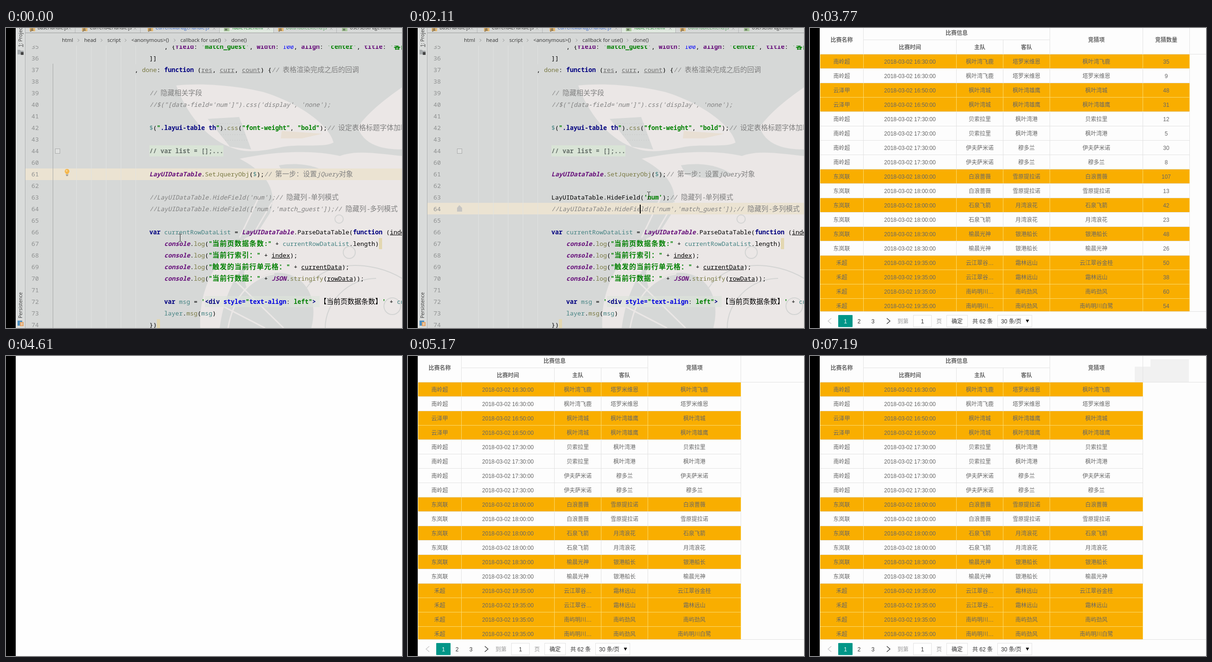
Animation, 856 px wide and 647 px high, one loop 8000 ms. Source, as an HTML page:

```html
<!DOCTYPE html>
<html lang="zh">
<head>
<meta charset="utf-8">
<title>Hide a table column</title>
<style>
html, body { margin: 0; width: 100%; height: 100%; overflow: hidden; background: #fefefe; }
#stage { position: absolute; left: 0; top: 0; width: 856px; height: 647px; overflow: hidden; }
#stage > div, #stage > svg, #code > * { position: absolute; left: 0; top: 0; }
#code, #code > svg, #page { width: 856px; height: 647px; }
#strip { width: 21px; height: 647px; background: #000; }
.anim, #code, #page { animation: 8s step-end infinite; }

#code { background: #d6d8d7; animation-name: code; }
.ln, .no { white-space: pre; font: 500 13.333px/25px "Noto Sans Mono", "DejaVu Sans Mono", monospace; color: #000; }
.no { width: 29px; text-align: right; color: #8f9191; }
.c { font: 15px/0 "Noto Sans CJK SC", "Noto Sans CJK", sans-serif; }
.k { color: #000080; font-weight: bold; }
.s { color: #008000; font-weight: bold; }
.s .c { font-weight: bold; letter-spacing: 1px; }
.a { color: #0000e0; font-weight: bold; }
.n { color: #0000ff; }
.p { color: #660e7a; font-weight: bold; }
.i { color: #660e7a; font-weight: bold; font-style: italic; }
.m { color: #7a7a43; }
.t { color: #458383; }
.g { color: #808080; font-style: italic; }
.q { color: #707070; text-decoration: underline; }
.u { text-decoration: underline; }
.f { color: #66706a; font-weight: bold; }
#row { left: 42px !important; width: 814px; height: 25px; background: #ebe3d2; animation-name: row; }
#caret { width: 2px; height: 19px; background: #000; animation-name: caret; }
#bulb { animation-name: bulb; }
#beam { animation-name: beam; }
#fold { animation-name: fold; }
#foldEnd { animation-name: foldEnd; }
#gutter { animation-name: gutter; }
#glint { animation-name: glint; }
#before { animation-name: before; }
#plain { animation-name: plain; }
#after { animation-name: after; }
.ui { font-family: "Open Sans", "Noto Sans", sans-serif; }

#page { animation-name: page; }
#page text { font: 12px "Liberation Sans", "Noto Sans CJK SC", "Noto Sans CJK", sans-serif; fill: #666; text-anchor: middle; }
#page text.h { font-weight: bold; }
.rows { animation-name: rows; }
.count { animation-name: count; }
#hoverA { animation-name: hoverA; }
#hoverB { animation-name: hoverB; }
#arrow { animation-name: arrow; }

@keyframes code { 0% { opacity: 1 } 47.125%, 100% { opacity: 0 } }
@keyframes page { 0% { opacity: 0 } 47.125% { opacity: 1 } 57.625% { opacity: 0 } 61.125%, 100% { opacity: 1 } }
@keyframes rows { 0% { opacity: 1 } 57.625% { opacity: 0 } 64.625%, 100% { opacity: 1 } }
@keyframes count { 0% { opacity: 1 } 64.625%, 100% { opacity: 0 } }
@keyframes hoverA { 0% { opacity: 0 } 74.875%, 100% { opacity: 1 } }
@keyframes hoverB { 0% { opacity: 0 } 81.625%, 100% { opacity: 1 } }
@keyframes row { 0% { transform: translateY(303px) } 8.75% { transform: translateY(353px) } 26.375%, 100% { transform: translateY(377px) } }
@keyframes caret {
  0% { opacity: 0; transform: translate(517px, 356px) }
  10.25% { opacity: 1; transform: translate(517px, 356px) }
  26.375%, 100% { opacity: 1; transform: translate(501px, 381px) }
}
@keyframes bulb {
  0% { opacity: 1; transform: translate(127px, 304px) }
  8.75% { opacity: 0; transform: translate(127px, 354px) }
  19.375% { opacity: 1; transform: translate(127px, 354px) }
  26.375% { opacity: 0; transform: translate(127px, 379px) }
  38.25%, 100% { opacity: 1; transform: translate(127px, 379px) }
}
@keyframes beam {
  0% { opacity: 1; transform: translate(373px, 444px) }
  1.875% { opacity: 1; transform: translate(435px, 419px) }
  3.875% { opacity: 1; transform: translate(540px, 356px) }
  5.375% { opacity: 1; transform: translate(636px, 305px) }
  6.875% { opacity: 1; transform: translate(584px, 336px) }
  8.75% { opacity: 1; transform: translate(517px, 353px) }
  34.875% { opacity: 1; transform: translate(579px, 484px) }
  36.75%, 100% { opacity: 0; transform: translate(579px, 484px) }
}
@keyframes fold { 0% { opacity: 1 } 8.75% { opacity: 0 } 13.75% { opacity: 1 } 26.375% { opacity: 0 } 29.875%, 100% { opacity: 1 } }
@keyframes foldEnd { 0% { opacity: 0 } 26.375%, 100% { opacity: 1 } }
@keyframes gutter { 0% { opacity: 0 } 45.625%, 100% { opacity: 1 } }
@keyframes glint { 0% { opacity: 0 } 34.875%, 100% { opacity: 1 } }
@keyframes before { 0% { opacity: 1 } 26.375%, 100% { opacity: 0 } }
@keyframes plain { 0% { opacity: 0 } 26.375% { opacity: 1 } 29.875%, 100% { opacity: 0 } }
@keyframes after { 0% { opacity: 0 } 29.875%, 100% { opacity: 1 } }
@keyframes arrow {
  0% { opacity: 0; transform: translate(763px, 272px) }
  70% { opacity: 1; transform: translate(763px, 272px) }
  71.5% { opacity: 1; transform: translate(790px, 150px) }
  73% { opacity: 1; transform: translate(807px, 56px) }
  74.875% { opacity: 1; transform: translate(762px, 7px) }
  76.375% { opacity: 1; transform: translate(736px, 22px) }
  78.25% { opacity: 1; transform: translate(768px, 109px) }
  79.875% { opacity: 1; transform: translate(790px, 88px) }
  81.625% { opacity: 1; transform: translate(744px, 22px) }
  83.125% { opacity: 1; transform: translate(714px, 50px) }
  84.625% { opacity: 1; transform: translate(702px, 101px) }
  86.5% { opacity: 1; transform: translate(720px, 442px) }
  88.375% { opacity: 1; transform: translate(722px, 630px) }
  89.875%, 100% { opacity: 0; transform: translate(722px, 630px) }
}
</style>
</head>
<body>
<div id="stage">
  <svg id="page">
    <rect width="856" height="647" fill="#fdfdfd"/>
    <rect id="hoverA" class="anim" x="736" y="7" width="83" height="49" fill="#f1f1f1"/>
    <rect id="hoverB" class="anim" x="702" y="23" width="34" height="33" fill="#f1f1f1"/>
    <g id="table"></g>
    <path id="arrow" class="anim" d="M.5 .5V16L4 12.6L6.6 18.4L9 17.4L6.4 11.8H11.5Z" fill="#fff" stroke="#000"/>
  </svg>

  <div id="code">
    <svg id="photo" fill="none">
      <g fill="#ebe7e6">
        <path d="M368 124C420 118 500 124 556 138C640 164 700 212 708 247C690 258 640 250 600 256C560 264 530 270 500 262C440 246 392 190 368 124Z"/>
        <path d="M856 128C810 160 780 186 760 214C772 246 800 262 856 262Z"/>
        <path d="M505 282C580 266 660 262 722 276C760 262 810 272 856 276V647H660C672 600 660 560 630 540C590 516 550 530 520 560C500 500 545 440 570 400C590 350 560 310 505 282Z"/>
        <path d="M420 647C416 570 450 490 520 452C560 432 610 440 640 470C560 450 480 510 462 647Z"/>
      </g>
      <g fill="#d6d8d7">
        <path d="M436 196L504 192L530 262L484 256Z"/>
        <path d="M590 296C640 288 680 300 700 316C670 326 630 326 600 316Z"/>
      </g>
      <path d="M596 222L684 228L640 238H594Z" fill="#e8dfd3"/>
      <g stroke="#d3d4d3" stroke-width="2">
        <circle cx="835" cy="600" r="18"/><circle cx="720" cy="412" r="9"/><circle cx="742" cy="484" r="13"/>
        <path d="M650 560C690 500 790 500 856 540M690 647C690 590 740 540 800 540"/>
      </g>
      <g stroke="#ebe7e6" stroke-width="3">
        <path d="M440 647C445 560 490 500 560 486M480 647C490 590 520 540 580 530M470 520L600 647M430 580L560 647M548 362L505 452M575 376L520 470"/>
      </g>
      <path d="M448 206L510 206M456 218L514 218M464 230L518 230M474 242L522 242" stroke="#c6c8c7" stroke-dasharray="2 3"/>
      <path id="glint" class="anim" d="M586 372L530 428L517 456L548 438L586 398Z" fill="#f5f4f1"/>
    </svg>
    <div id="row" class="anim"></div>
    <svg>
      <g id="guides" stroke="#e0e2e1"></g>
      <g id="gutter" class="anim">
        <rect x="102" y="77" width="9" height="570" fill="#cacaca"/>
        <g id="marks" fill="#dadada"></g>
        <path d="M118 101.5H310" stroke="#c9cbca"/>
      </g>
      <path id="fold" class="anim" d="M101.5 77V647" stroke="#a6a8a8"/>
      <rect x="106.500" y="260.500" width="10" height="10" fill="#dfe0df" stroke="#a9abab"/>
      <path id="foldEnd" class="anim" d="M106 396V388L111 382L117 388V396Z" fill="#c6c5c3"/>
      <rect x="310" y="253" width="160" height="24" fill="#d9e4d6"/>
      <rect x="806" y="453" width="7" height="24" fill="#e3d7b0"/>
      <rect x="326" y="628" width="7" height="19" fill="#e3d7b0"/>
      <rect x="430" y="578" width="248" height="24" fill="#dce5da" opacity=".6"/>
    </svg>
    <div id="lines"></div>
    <div id="caret" class="anim"></div>
    <svg class="ui">
      <rect width="856" height="38" fill="#d6d8d7"/>
      <rect x="461" width="117" height="10" fill="#dfe8df"/>
      <path d="M42 10.500H856" stroke="#9b9d9d"/>
      <g id="tabs" font-size="10"></g>
      <g id="crumbs" font-size="11.200" fill="#333"></g>
      <rect x="21" width="20" height="647" fill="#d9dbda"/>
      <path d="M21.500 0V647" stroke="#f4f4f4"/>
      <path d="M41.500 0V647" stroke="#aeb0b0"/>
      <g font-size="10.500" fill="#333">
        <text transform="translate(35 41) rotate(-90)"><tspan text-decoration="underline">1</tspan>: Project</text>
        <text transform="translate(35 626) rotate(-90)">Persistence</text>
      </g>
      <path d="M25 47H30L32 49H38V57H25Z" fill="#a5a9ab"/>
      <rect x="32" y="52" width="6" height="6" fill="#444"/>
      <rect x="25" y="631" width="10" height="11" fill="#4d8fc0"/>
      <path d="M30 634H38V643H30Z" fill="#e2a56a"/><path d="M32 637H36M32 640H36" stroke="#fff"/>
      <g id="bulb" class="anim">
        <path d="M5 0A5 5 0 0 1 8 9L7.500 11H2.500L2 9A5 5 0 0 1 5 0Z" fill="#f4b64c"/>
        <circle cx="4" cy="4" r="2" fill="#f9d68e"/>
        <path d="M2.500 12.500H7.500M3 14.500H7" stroke="#6e6e6e"/>
      </g>
      <path id="beam" class="anim" d="M0 .5H2.500L3.500 1.500L4.500 .5H7M3.500 1V16M0 16.500H2.500L3.500 15.500L4.500 16.500H7" fill="none" stroke="#222"/>
    </svg>
  </div>
  <div id="strip"></div>
</div>

<script>
const $ = id => document.getElementById(id);
const escape = s => s.replace(/&/g, '&amp;').replace(/</g, '&lt;');

// «x text» gives text the token class x
const paint = s => escape(s)
  .replace(/[\u3000-\u9fff\uff00-\uffef]+/g, '<span class="c" style="font-style:normal">$&</span>')
  .replace(/«(\w) (.*?)»/g, '<span class="$1">$2</span>');

const obj = '«i LayUIDataTable»';
const log = '«i console».«m log»(';
const note = '«g // 隐藏列-单列模式»';
const numbers = [35, 36, 37, 38, 39, 40, 41, 42, 43, 44, 60, 61, 62, 63, 64, 65, 66, 67, 68, 69, 70, 71, 72, 73, 74];
// line number, x, text, id of a changing line
const source = [
  [35, 342, ", {«p field»: «s 'match_guest'», «p width»: «n 100», «p align»: «s 'center'», «p title»: «s '客队'»"],
  [36, 310, ']]'],
  [37, 278, ', «m done»: «k function» («q res», «q curr», «q count») {«g // 表格渲染完成之后的回调»'],
  [39, 310, '«g // 隐藏相关字段»'],
  [40, 310, `«g //$("[data-field='num']").css('display', 'none');»`],
  [42, 310, '«t $»(«s "»«k .layui-table th»«s "»).«m css»(«s "font-weight"», «s "bold"»);«g // 设定表格标题字体加粗»'],
  [44, 310, '«f // var list = [];...»'],
  [61, 310, obj + '.«m SetJqueryObj»(«t $»);«g // 第一步：设置jQuery对象»'],
  [63, 310, "«g //LayUIDataTable.HideField('num');// 隐藏列-单列模式»", 'before'],
  [63, 310, "LayUIDataTable.HideField(«s 'num'»);" + note, 'plain'],
  [63, 310, obj + ".«m HideField»(«s 'num'»);" + note, 'after'],
  [64, 310, "«g //LayUIDataTable.HideField(['num','match_guest']);// 隐藏列-多列模式»"],
  [66, 310, '«k var» «t currentRowDataList» = ' + obj + '.ParseDataTable(«k function» («u index», «u currentData»'],
  [67, 342, log + '«s "当前页数据条数:"» + «t currentRowDataList».length)'],
  [68, 342, log + '«s "当前行索引："» + «u index»);'],
  [69, 342, log + '«s "触发的当前行单元格："» + «u currentData»);'],
  [70, 342, log + '«s "当前行数据："» + «i JSON».«m stringify»(«u rowData»));'],
  [72, 342, `«k var» «t msg» = «s '»«k <div» «a style=»«s "»«a text-align»: «s left"»«k >» 【当前页数据条数】«s '» + «t currentRowDataList»`],
  [73, 342, '«t layer».«m msg»(«t msg»)'],
  [74, 310, '})']
];
const place = (cls, x, i, html, id) =>
  `<div class="${cls}${id ? ' anim' : ''}"${id ? ` id="${id}"` : ''} style="position:absolute;left:${x}px;top:${28 + 25 * i}px">${html}</div>`;
$('lines').innerHTML =
  numbers.map((n, i) => place('no', 42, i, n)).join('') +
  source.map(([n, x, s, id]) => place('ln', x, numbers.indexOf(n), paint(s), id)).join('');

$('guides').innerHTML = [0, 1, 2, 3, 4].map(i => `<path d="M${152.5 + 32 * i} 38V${i < 4 ? 647 : 78}"/>`).join('') +
  '<path d="M280.500 102V647"/>';
$('marks').innerHTML = [89, 140, 165, 365, 440, 640].map(y => `<path d="M106 ${y - 5}H111V${y + 5}L106 ${y}Z"/>`).join('');

const tabs = [
  [51, 'JS', 'BaseHandle.js', '#333'], [164, 'JS', 'CurrentAEHandle.js', '#333'],
  [306, 'JS', 'CurrentManageHandle.js', '#2c5fc4'], [471, 'H', 'TableTest.html', '#0a7a1c'],
  [588, 'JS', 'DataTableExtend.js', '#4f9a58'], [726, 'H', 'UsersListPage.html', '#333']
];
const ends = [149, 290, 461, 578, 714];
$('tabs').innerHTML = tabs.map(([x, kind, name, color]) =>
  `<rect x="${x}" y="-4" width="12" height="11" fill="${kind == 'H' ? '#a9c99a' : '#e3b872'}"/>` +
  `<text x="${x + 2}" y="6" font-size="7" font-weight="bold" fill="#444">${kind}</text>` +
  `<text x="${x + 17}" y="3" fill="${color}">${name}</text>`).join('') +
  ends.map(x => `<path d="M${x + .5} 0V10" stroke="#b4b6b6"/><path d="M${x - 14} -2L${x - 8} 4M${x - 8} -2L${x - 14} 4" stroke="#a5a7a7"/>`).join('');

const crumbs = [[121, 'html'], [169, 'head'], [219, 'script'], [271, '<anonymous>()'], [377, 'callback for use()'], [487, 'done()']];
$('crumbs').innerHTML = crumbs.map(([x, s], i) => `<text x="${x}" y="30">${escape(s)}</text>` +
  (i ? `<path d="M${x - 14} 23.500L${x - 11} 26.500L${x - 14} 29.500" fill="none" stroke="#8a8c8c"/>` : '')).join('');

// ---- table ----
const edges = [21, 115, 316, 417, 518, 719, 820];
const mid = i => (edges[i] + edges[i + 1]) / 2 + .5;
const text = (x, y, s, attr = '') => `<text x="${x}" y="${y + 4.5}" ${attr}>${s}</text>`;
const rect = (x, y, w, h, fill, attr = '') => `<rect x="${x}" y="${y}" width="${w}" height="${h}" fill="${fill}" ${attr}/>`;
const line = '#e2e2e2', orange = '#f9ae00', gold = '#fbdc70';

// league, time, home, guest, then two [pick, count]; pick 0 is home, 1 is guest
const games = [
  ['南岭超', '16:30', '枫叶湾飞鹿', '塔罗米维恩', [0, 35], [1, 9]],
  ['云泽甲', '16:50', '枫叶湾城', '枫叶湾雄鹰', [0, 48], [1, 31]],
  ['南岭超', '17:30', '贝索拉里', '枫叶湾港', [0, 12], [1, 5]],
  ['南岭超', '17:30', '伊夫萨米诺', '穆多兰', [0, 30], [1, 8]],
  ['东岚联', '18:00', '白浪蔷薇', '雪原提拉诺', [0, 107], [1, 13]],
  ['东岚联', '18:00', '石泉飞箭', '月湾浪花', [0, 42], [1, 23]],
  ['东岚联', '18:30', '榆晨光神', '银港船长', [1, 48], [0, 26]],
  ['禾超', '19:35', '云江翠谷金桂', '霜林远山', [0, 50], [1, 38]],
  ['禾超', '19:35', '南屿明川白鹭', '南屿劲风', [1, 60], [0, 54]]
];
const rows = games.flatMap(([league, time, home, guest, ...picks]) => picks.map(([side, n]) =>
  [league, `2018-03-02 ${time}:00`, home.length > 5 ? home.slice(0, 4) + '…' : home, guest, side ? guest : home, n]));

function drawRow(row, i, from, to) {
  const y = 57 + 31 * i, hot = row[5] > 30, next = rows[i + 1];
  const x = from ? edges[from] + 1 : 22, w = edges[to] - x + 1, h = Math.min(30, 611 - y);
  let out = hot ? rect(x, y, w, h, orange) : '';
  if (next) out += rect(x, y + 30, w, 1, hot && next[5] > 30 ? gold : line);
  for (let c = from; c < to; c++)
    out += rect(edges[c + 1], y, 1, h, hot ? gold : line) + text(mid(c), y + 15, row[c]);
  return out;
}
const body = (from, to) => rows.map((r, i) => drawRow(r, i, from, to)).join('');
const box = (x, w) => rect(x + .5, 619.5, w, 25, '#fff', `stroke="${line}"`);
const left = 'style="text-anchor:start;fill:#333"';
const dim = 'style="fill:#999"', dark = 'style="fill:#333"';

const header =
  text(mid(0), 25, '比赛名称', 'class="h"') + text(317, 10, '比赛信息', 'class="h"') +
  text(mid(1), 41, '比赛时间', 'class="h"') + text(mid(2), 41, '主队', 'class="h"') +
  text(mid(3), 41, '客队', 'class="h"') + text(mid(4), 25, '竞猜项', 'class="h"') +
  rect(115, 25, 403, 1, line) + rect(22, 56, 834, 1, line) +
  [115, 518, 719].map(x => rect(x, 0, 1, 56, line)).join('') +
  [316, 417].map(x => rect(x, 25, 1, 31, line)).join('') + rect(22, 611, 834, 1, line);

const pager =
  '<path d="M46 626L39 632L46 638" fill="none" stroke="#c8c8c8" stroke-width="1.300"/>' +
  '<path d="M166 626L173 632L166 638" fill="none" stroke="#333" stroke-width="1.300"/>' +
  rect(61, 619, 31, 26, '#009688', 'rx="1"') + text(76.5, 632, 1, 'style="fill:#fff"') +
  text(106, 632, 2, dark) + text(136, 632, 3, dark) +
  text(201, 632, '到第', dim) + box(223, 39) + text(243, 632, 1, dark) + text(279, 632, '页', dim) +
  box(295, 45) + text(318, 632, '确定', dark) + text(373, 632, '共 62 条', dark) +
  box(405, 74) + text(413, 632, '30 条/页', left) + '<path d="M466.500 629H473.500L470 635.500Z" fill="#000"/>';

$('table').innerHTML = header +
  `<g class="anim rows">${body(0, 5)}${pager}</g>` +
  `<g class="anim count">${text(mid(5), 25, '竞猜数量', 'class="h"')}${rect(820, 0, 1, 56, line)}` +
  `<g class="anim rows">${body(5, 6)}</g></g>`;
</script>
</body>
</html>
```
